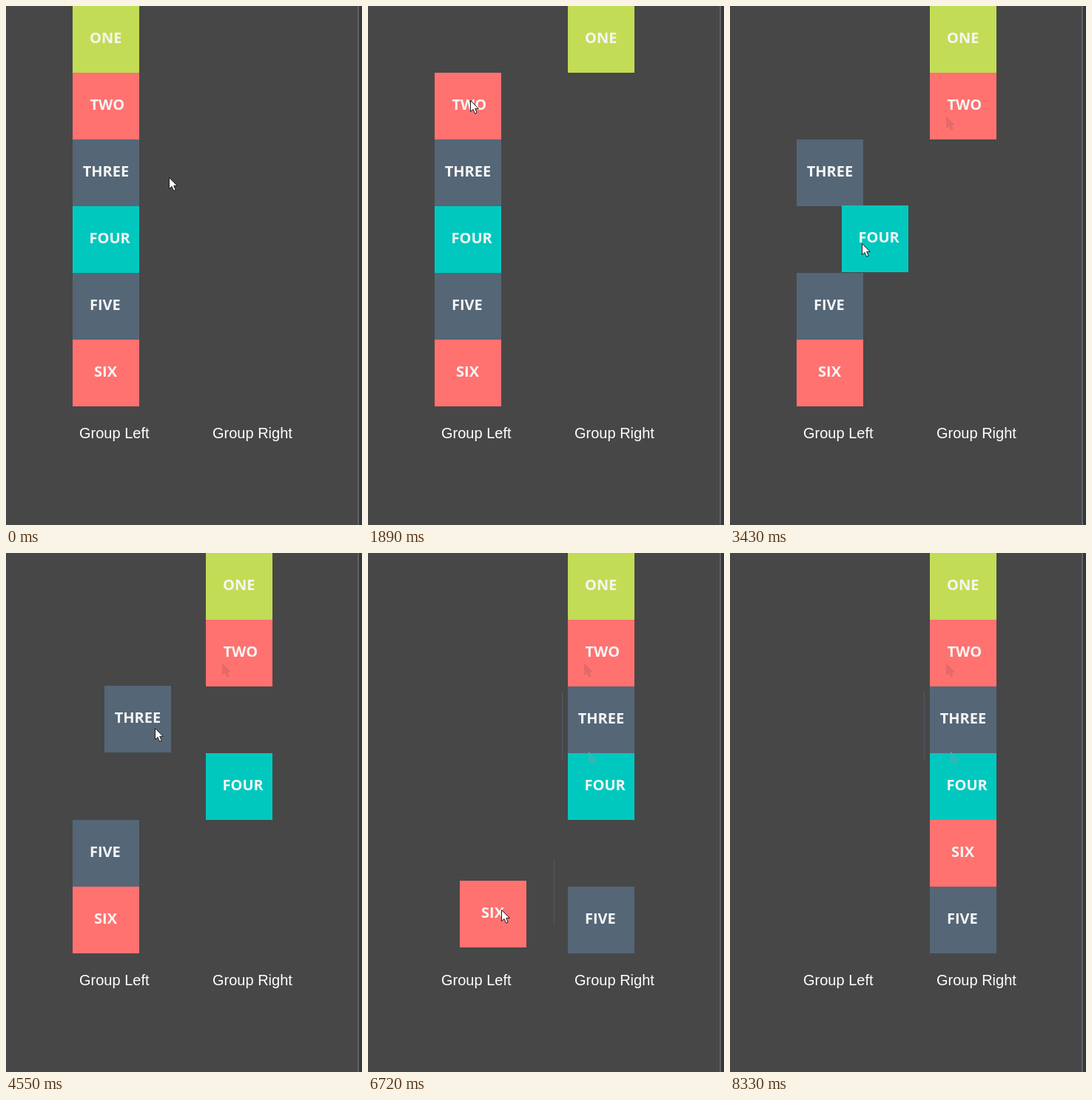
An HTML page that plays this animation: 481x700 px, repeating every 9.1 s.

```html
<!DOCTYPE html>
<html lang="en">
<head>
<meta charset="utf-8">
<title>Drag between groups</title>
<style>
html, body { margin: 0; width: 100%; height: 100%; overflow: hidden; background: #474747; }
#stage { position: relative; width: 481px; height: 700px; overflow: hidden; background: #474747; }
#stage > * { position: absolute; left: 0; top: 0; }
.tile {
  width: 90px; height: 90px; color: #f5f5f5; white-space: nowrap; box-sizing: border-box;
  font: 700 20px/85px "Open Sans", "Noto Sans", sans-serif;
}
#stage > .group {
  top: 565px; color: #fff; white-space: nowrap;
  font: 20px/22px "Liberation Sans", Arial, sans-serif;
}
#stage > .edge { left: 475px; width: 4px; height: 700px; background: #34373d; border-left: 2px solid #606266; }
svg { width: 14px; height: 21px; overflow: visible; }
</style>
</head>
<body>
<div id="stage">
  <div class="edge"></div>
  <div class="group" style="left:99px">Group Left</div>
  <div class="group" style="left:279px">Group Right</div>
</div>
<script>
const LOOP = 9100, STEP = 70, LAST = 8330;
const SIZE = 90, LEFT = 90, RIGHT = 270;
const LIME = '#c3dc56', CORAL = '#ff7270', SLATE = '#556677', TEAL = '#00c8bf';
const stage = document.getElementById('stage');

// A tile waits in row `from`, follows its drag ("ms x y" points), then snaps into row `to`.
const tiles = [
  { label: 'ONE', color: LIME, inset: 23, from: 0, to: 0, grab: [40, 50], snap: 1260,
    drag: '560 90 0, 840 200 14, 980 255 16, 1190 283 16' },
  { label: 'TWO', color: CORAL, inset: 23.5, from: 1, to: 1, grab: [48, 37], snap: 2730,
    drag: '1960 112 91, 2310 205 106, 2590 267 109' },
  { label: 'THREE', color: SLATE, inset: 13.7, from: 2, to: 2, grab: [68, 57], snap: 5040,
    drag: '4550 133 179, 4970 262 188' },
  { label: 'FOUR', color: TEAL, inset: 22.6, from: 3, to: 3, grab: [27, 51], snap: 3990,
    drag: '3360 118 270, 3430 151 269, 3640 237 243, 3850 262 240' },
  { label: 'FIVE', color: SLATE, inset: 23, from: 4, to: 5, grab: [66, 56], snap: 6160,
    drag: '5600 99 360, 6090 251 413' },
  { label: 'SIX', color: CORAL, inset: 29, from: 5, to: 4, grab: [56, 39], snap: 7560,
    drag: '6720 124 442, 7000 230 395, 7280 298 364, 7420 290 364' }
];

// pointer positions between the drags
const roam = `0 220 231, 420 128 58, 1890 138 127, 2800 292 149, 3220 107 321,
  4060 270 287, 4410 148 236, 4480 148 236, 5110 298 268, 5320 176 411, 5530 146 416,
  6440 169 480, 6580 136 491, 6650 136 491, 7770 391 480, 8050 373 570, 8260 378 671, 8330 378 720`;

function parse(text) {
  return text.split(',').map(p => p.trim().split(' ').map(Number));
}

function add(html) {
  stage.insertAdjacentHTML('beforeend', html);
  return stage.lastElementChild;
}

function arrow(fill, stroke, z) {
  const el = add(`<svg><path d="M.5 .5V15.5L4 12.4L6.6 18.2L9.2 17L6.7 11.4H11.3Z"
    fill="${fill}" stroke="${stroke}"/></svg>`);
  el.style.zIndex = z;
  return el;
}

function line(height, color) {
  return add(`<div style="width:1px;height:${height}px;background:${color}"></div>`);
}

function place(el, x, y) {
  el.style.transform = `translate(${x}px, ${y}px)`;
}

function at(path, t) {
  const i = path.findIndex(p => p[0] > t);
  if (i < 0) return path[path.length - 1].slice(1);
  const [t0, x0, y0] = path[i - 1], [t1, x1, y1] = path[i];
  const k = (t - t0) / (t1 - t0);
  return [Math.round(x0 + (x1 - x0) * k), Math.round(y0 + (y1 - y0) * k)];
}

const pointerPath = parse(roam);
for (const tile of tiles) {
  tile.path = parse(tile.drag);
  const [, x, y] = tile.path[tile.path.length - 1];
  tile.path.push([tile.snap - STEP, x, y]);
  const [dx, dy] = tile.grab;
  pointerPath.push(...tile.path.map(([t, x, y]) => [t, x + dx, y + dy]));
  tile.start = tile.path[0][0];
  tile.el = add(`<div class="tile" style="background:${tile.color};padding-left:${tile.inset}px">${tile.label}</div>`);
}
pointerPath.sort((a, b) => a[0] - b[0]);

// faint traces left behind by the drags
const traces = [
  { el: arrow('#e46a69', '#e46a69', LOOP), from: 2870, until: LOOP, x: 292, y: 149 },
  { el: arrow('#2fb9b6', '#2fb9b6', LOOP), from: 5180, until: LOOP, x: 298, y: 268 },
  { el: line(90, '#525c66'), from: 5040, until: LOOP, x: 262, y: 188 },
  { el: line(91, '#505b5c'), from: 6160, until: 7000, x: 251, y: 412 }
];
traces.forEach(s => place(s.el, s.x, s.y));

const pointer = arrow('#fff', '#1c1c1c', LOOP + 1);

function tileAt(tile, t) {
  if (t < tile.start) return [LEFT, tile.from * SIZE];
  if (t >= tile.snap) return [RIGHT, tile.to * SIZE];
  return at(tile.path, t);
}

function draw(ms) {
  const t = Math.min(Math.floor((ms % LOOP) / STEP) * STEP, LAST);
  for (const tile of tiles) {
    place(tile.el, ...tileAt(tile, t));
    tile.el.style.zIndex = t >= tile.start ? tile.start : 1;
  }
  for (const s of traces) {
    s.el.style.visibility = t >= s.from && t < s.until ? 'visible' : 'hidden';
  }
  place(pointer, ...at(pointerPath, t));
}

const start = performance.now();
function tick() {
  draw(performance.now() - start);
  requestAnimationFrame(tick);
}
tick();
</script>
</body>
</html>
```
